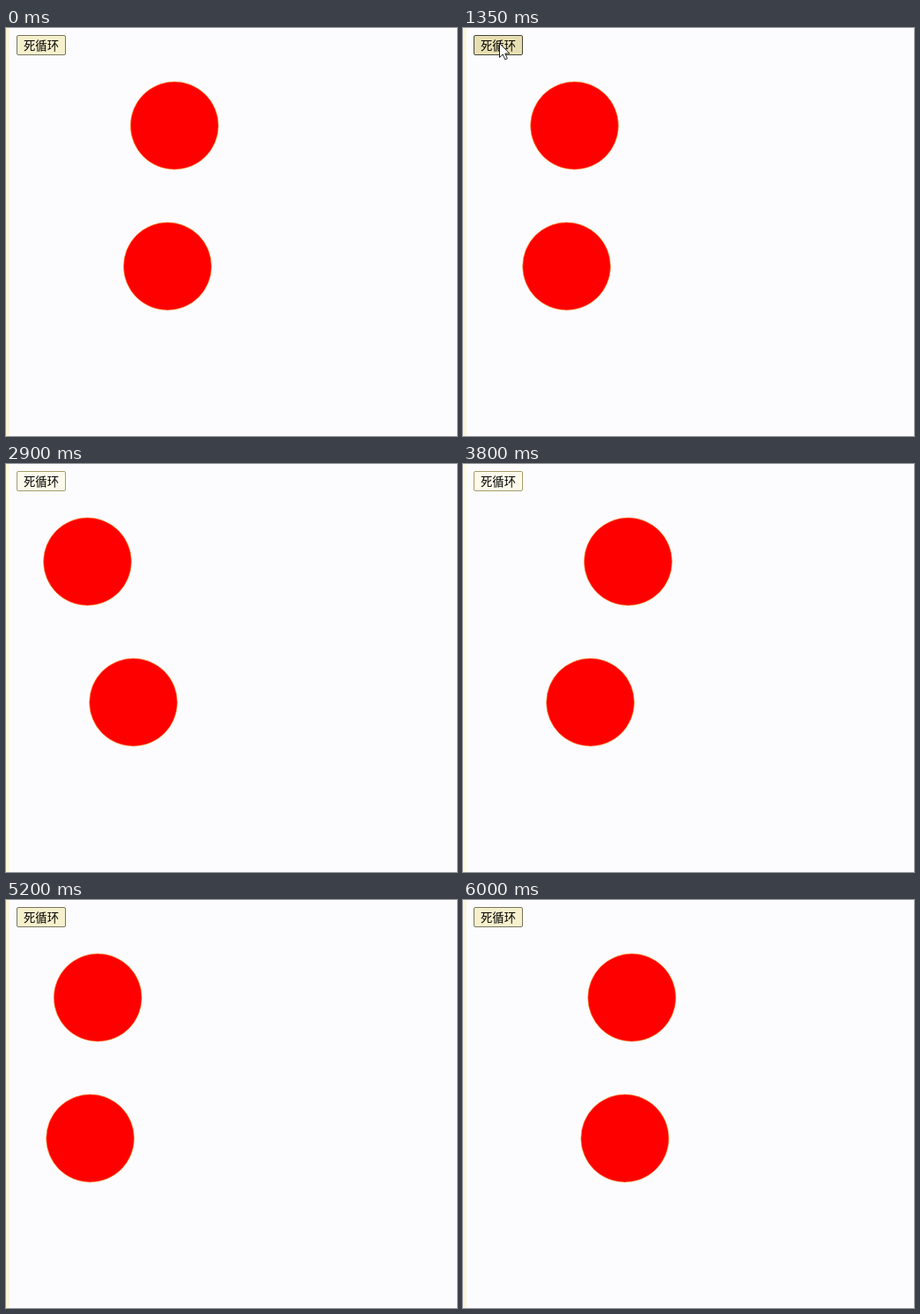
An HTML page for the animation above (6050 ms loop, 512 by 464 pixels).

```html
<!DOCTYPE html>
<html lang="zh-CN">
<head>
<meta charset="utf-8">
<style>
  html, body { margin: 0; width: 100%; height: 100%; overflow: hidden; background: #fcfcfe; }
  svg { display: block; width: 512px; height: 464px; }
  text { font: 13.333px "Noto Sans CJK SC", "Noto Sans CJK", sans-serif; }
</style>
</head>
<body>
<svg viewBox="0 0 512 464">
  <rect width="512" height="464" fill="#fcfcfe"/>
  <rect id="strip" width="4" height="464"/>
  <rect id="button" x="12.5" y="8.5" width="55" height="22" rx="1.5"/>
  <text x="20" y="24.5">死循环</text>
  <g fill="#fe0000" stroke="#f9a23c" stroke-width="0.6">
    <circle id="smooth" cy="111" r="49.9"/>
    <circle id="blocked" cy="271" r="49.9"/>
  </g>
  <path id="cursor" d="M.5 .5V16.5L4.2 13L6.8 18.8L9.3 17.7L6.8 12H11.8Z" fill="#fff" stroke="#222" stroke-width="1"/>
</svg>
<script>
const LOOP = 6050, STEP = 50;
const LEG = 1004, FIRST_MIN = 940;
const FREEZE = 1510, THAW = 4510;
const $ = id => document.getElementById(id);
const set = (id, attrs) => {
  for (const name in attrs) $(id).setAttribute(name, attrs[name]);
};

// cubic-bezier(.42, 0, .58, 1), solved by bisection
function easeInOut(x) {
  let lo = 0, hi = 1;
  for (let i = 0; i < 24; i++) {
    const s = (lo + hi) / 2;
    if (s * (1.26 + s * (-0.78 + s * 0.52)) < x) lo = s; else hi = s;
  }
  return lo * lo * (3 - 2 * lo);
}

// 0 at the left end, 1 at the right end
function swing(t) {
  const legs = (t - FIRST_MIN) / LEG + 4;
  const phase = legs % 2;
  return easeInOut(phase > 1 ? 2 - phase : phase);
}

// Pointer path: [time, x, y]
const entering = [[350, 424, 290], [650, 245, 150], [1000, 48, 22], [1150, 41, 17]];
const leaving = [[1700, 41, 17], [1850, 90, 22], [2000, 178, 41], [2100, 268, 120], [2200, 394, 250]];
const route = [...entering, ...leaving];

function pointerAt(t) {
  const i = route.findIndex(p => p[0] >= t);
  if (i < 0 || t < route[0][0]) return null;
  if (i === 0) return route[0].slice(1);
  const [t0, x0, y0] = route[i - 1], [t1, x1, y1] = route[i];
  const k = (t - t0) / (t1 - t0);
  return [x0 + (x1 - x0) * k, y0 + (y1 - y0) * k];
}

const looks = {
  idle: ["#f6f0cc", "#77745c"],
  hover: ["#e7dfb2", "#45443a"],
  stuck: ["#fcfaea", "#a59d68"]
};

function buttonLook(t) {
  if (t >= FREEZE && t < THAW) return looks.stuck;
  return t >= 1000 && t < FREEZE ? looks.hover : looks.idle;
}

function draw(t) {
  const blockedTime = t >= FREEZE && t < THAW ? FREEZE : t;
  set("smooth", { cx: 92 + 100 * swing(t) });
  set("blocked", { cx: 84 + 100 * swing(blockedTime - 6) });

  const [fill, stroke] = buttonLook(t);
  set("button", { fill, stroke });
  set("strip", { fill: t >= FREEZE && t < 4600 ? "#fdfbdc" : "#fbf6da" });

  const at = pointerAt(t);
  set("cursor", {
    visibility: at ? "visible" : "hidden",
    transform: at ? `translate(${at.map(Math.round)})` : ""
  });
}

const start = performance.now();
function tick() {
  const t = (performance.now() - start) % LOOP;
  draw(Math.floor(t / STEP) * STEP);
  requestAnimationFrame(tick);
}
tick();
</script>
</body>
</html>
```
